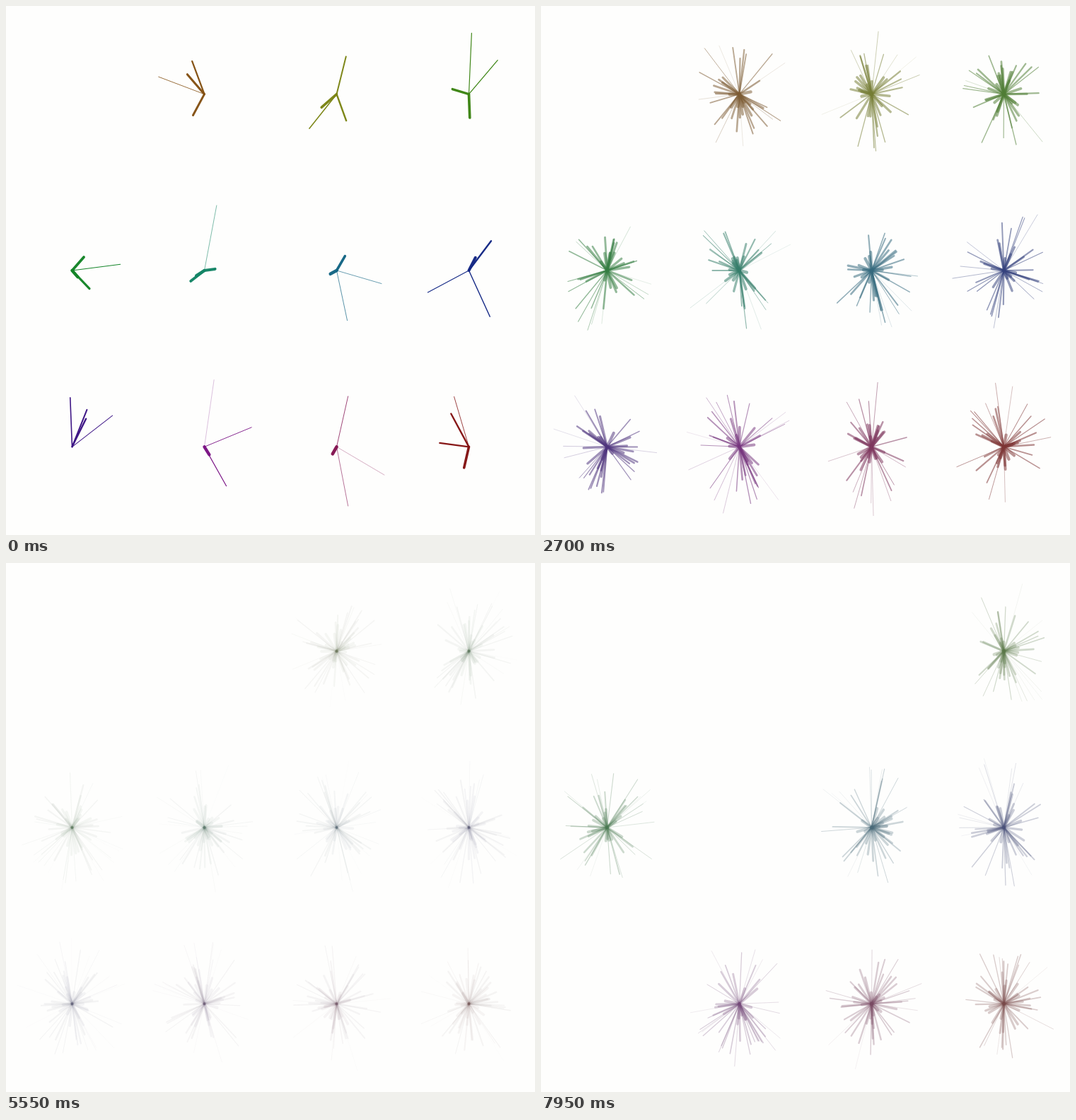
These frames come from a looping animation (748x748 px, 8000 ms). An HTML page with a canvas:

```html
<!DOCTYPE html>
<html lang="en">
<head>
<meta charset="utf-8">
<title>Bursts</title>
<style>
  html, body { margin: 0; width: 100%; height: 100%; overflow: hidden; background: #fefefd; }
  canvas { display: block; width: 748px; height: 748px; }
</style>
</head>
<body>
<canvas id="stage" width="748" height="748"></canvas>
<script>
const ctx = document.getElementById('stage').getContext('2d');
const SIZE = 748, COLS = 4, ROWS = 3, CELLS = COLS * ROWS;
const STEP = 150, LOOP = 8000, HALF = 39;

function randomFrom(seed) {
  let s = Math.imul(seed + 1, 0x9E3779B1);
  return () => {
    s = (s + 0x6D2B79F5) | 0;
    let t = Math.imul(s ^ (s >>> 15), s | 1);
    t ^= t + Math.imul(t ^ (t >>> 7), t | 61);
    return ((t ^ (t >>> 14)) >>> 0) / 4294967296;
  };
}

// Spokes from the centre: the longer, the thinner.
function burst(count, rand) {
  for (let i = 0; i < count; i++) {
    const t = rand();
    const angle = rand() * Math.PI * 2;
    const r = (15 + 87 * t) * (.72 + .33 * rand());
    ctx.lineWidth = .2 + 4.4 * (1 - t);
    ctx.beginPath();
    ctx.moveTo(0, 0);
    ctx.lineTo(Math.cos(angle) * r * .78, Math.sin(angle) * r);
    ctx.stroke();
  }
}

function draw(step) {
  // Spokes multiply while they fade, then the whole runs backwards.
  const phase = Math.PI * step / HALF;
  const strength = (1 + Math.cos(phase)) / 2;
  const count = Math.round(4 + 58 * Math.sin(phase / 2));
  const sat = 12 + 62 * strength ** 1.4;
  const light = 42 - 12 * strength;

  ctx.globalAlpha = 1;
  ctx.fillStyle = '#fefefd';
  ctx.fillRect(0, 0, SIZE, SIZE);
  ctx.lineCap = 'round';
  ctx.globalAlpha = .06 + .92 * strength ** 1.15;

  for (let cell = 0; cell < CELLS; cell++) {
    // A cell rests whenever its number divides the number of the step.
    if ((step + 1) % (cell + 1) === 0) continue;

    ctx.strokeStyle = `hsl(${cell * 360 / (CELLS - 1)}, ${sat}%, ${light}%)`;
    ctx.save();
    ctx.translate((cell % COLS + .5) * SIZE / COLS,
                  (Math.floor(cell / COLS) + .5) * SIZE / ROWS);
    burst(count, randomFrom(step * CELLS + cell));
    ctx.restore();
  }
}

let shown = -1;
function tick() {
  const step = Math.floor(performance.now() % LOOP / STEP);
  if (step !== shown) draw(shown = step);
  requestAnimationFrame(tick);
}
tick();
</script>
</body>
</html>
```
